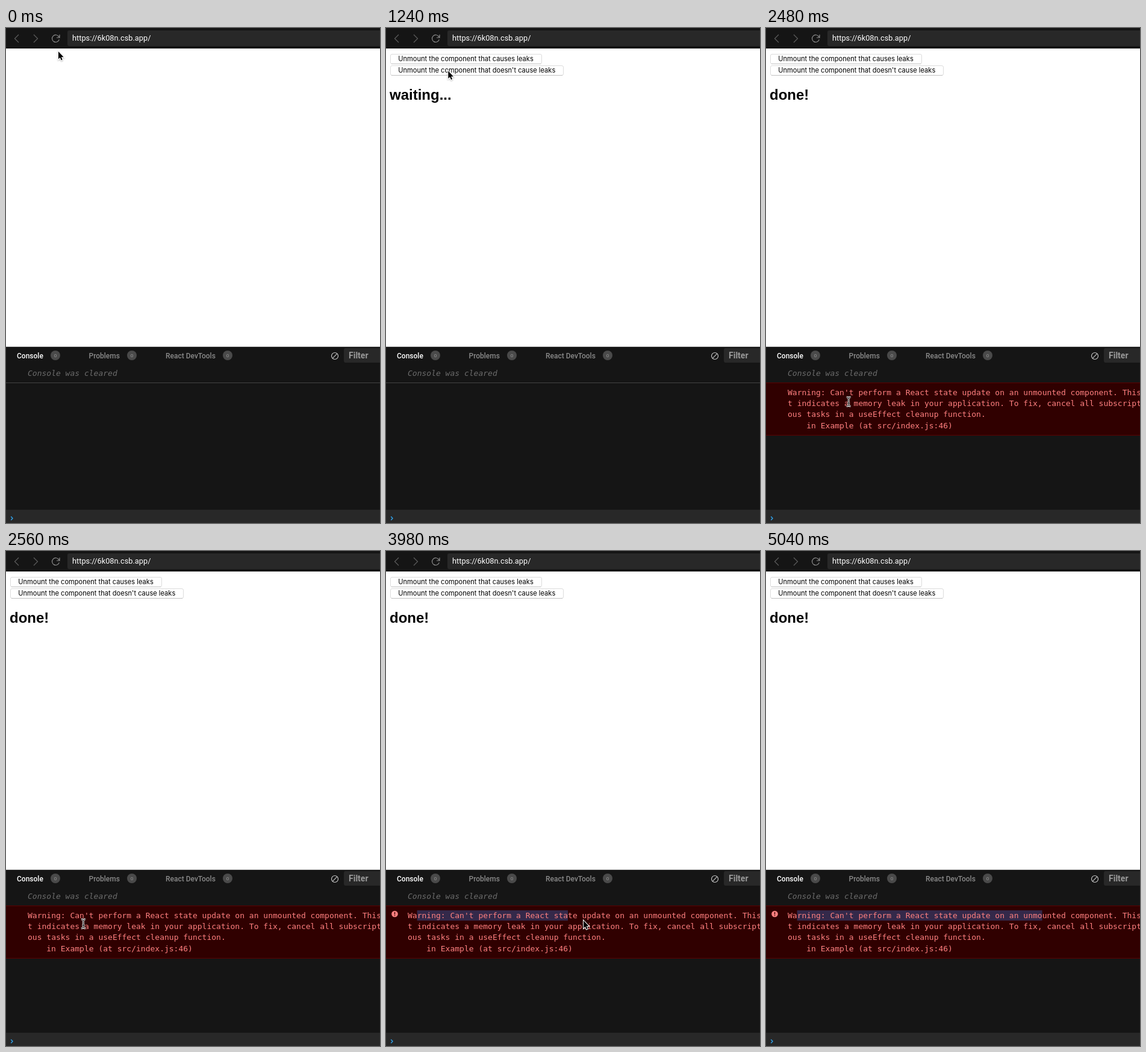
An HTML page for the animation above (5.76 s loop, 621 px wide and 821 px high).

```html
<!DOCTYPE html>
<html lang="en">
<head>
<meta charset="utf-8">
<title>Leaking component demo</title>
<style>
  html, body { margin: 0; width: 100%; height: 100%; overflow: hidden; background: #151515; }
  svg { display: block; width: 621px; height: 821px; }
  text { white-space: pre; }
  .url { font: 12.8px Roboto, sans-serif; fill: #fff; }
  .tab { font: 500 12px Roboto, sans-serif; fill: #8a8a8a; }
  .tab.active { fill: #fff; }
  .count { font: 8px Roboto, sans-serif; fill: #999; text-anchor: middle; }
  .filter { font: 700 14px Roboto, sans-serif; fill: #999; }
  .label { font: 11.1px Inter, sans-serif; fill: #000; }
  .title { font: 700 24px "Liberation Sans", Arial, sans-serif; fill: #000; }
  .log { font: 13px "DejaVu Sans Mono", monospace; fill: #ff8080; }
  .note { font: italic 13px "DejaVu Sans Mono", monospace; fill: #6c6c6c; }
  .line { fill: none; stroke-width: 1.2; }
  .button rect { fill: #fff; stroke: #dcdcdc; }
  .button path { stroke: #c2c2c2; }
  .button .pressed { fill: url(#pressed); stroke: none; }
  [hidden] { display: none; }
</style>
</head>
<body>
<svg viewBox="0 0 621 821">
  <defs>
    <linearGradient id="pressed" x2="0" y2="1">
      <stop stop-color="#d17fc5"/><stop offset="1" stop-color="#a83f98"/>
    </linearGradient>
    <filter id="shadow" x="-50%" y="-50%" width="200%" height="200%">
      <feDropShadow dx="0" dy="1" stdDeviation=".8" flood-opacity=".35"/>
    </filter>
    <path id="beamShape" d="M-3.5 -7.5Q0 -7.5 0 -5Q0 -7.5 3.5 -7.5M0 -5V5M-3.5 7.5Q0 7.5 0 5Q0 7.5 3.5 7.5M-2 2.5H2"/>
  </defs>

  <rect width="621" height="821" fill="#151515"/>

  <!-- address bar -->
  <path class="line" stroke="#5c5c5c" d="M21 11L14.5 17.5L21 24M46 11L52.5 17.5L46 24"/>
  <path class="line" stroke="#8c8c8c" d="M88.3 19.2A6 6 0 1 1 87.6 14.2L88.6 15.8M89 11V16H84"/>
  <rect x="102" y="4" width="530" height="26" rx="3" fill="#282828"/>
  <text class="url" x="110" y="21">https://6k08n.csb.app/</text>

  <!-- page -->
  <rect y="34" width="621" height="494" fill="#fff"/>
  <rect y="528" width="621" height="1" fill="#c4c4c4"/>
  <g id="page">
    <g class="button">
      <rect x="7.5" y="43.5" width="251" height="16" rx="2.5"/>
      <path d="M9 59.5H257"/>
      <rect id="press" class="pressed" x="7" y="43" width="252" height="17" rx="3"/>
      <text class="label" x="20.3" y="55">Unmount the component that causes leaks</text>
    </g>
    <text id="leakyTitle" class="title" x="6" y="100">waiting...</text>
    <g id="safe" class="button">
      <rect x="7.5" y="62.5" width="287" height="16" rx="2.5"/>
      <path d="M9 78.5H293"/>
      <text class="label" x="20.3" y="74">Unmount the component that doesn't cause leaks</text>
      <text id="safeTitle" class="title" x="6" y="119">waiting...</text>
    </g>
  </g>

  <!-- console -->
  <g class="tabs">
    <text class="tab active" x="18" y="548">Console</text>
    <text class="tab" x="137.5" y="548">Problems</text>
    <text class="tab" x="265" y="548">React DevTools</text>
    <g fill="#4a4a4a">
      <circle cx="82" cy="543" r="8"/><circle cx="209" cy="543" r="8"/><circle cx="368" cy="543" r="8"/>
    </g>
    <text class="count" x="82" y="546">0</text>
    <text class="count" x="209" y="546">0</text>
    <text class="count" x="368" y="546">0</text>
  </g>
  <g class="line" stroke="#c4c4c4"><circle cx="546" cy="544" r="5.5"/><path d="M542.2 547.8L549.8 540.2"/></g>
  <rect x="561" y="531" width="70" height="24" rx="3" fill="#282828"/>
  <text class="filter" x="569" y="548">Filter</text>
  <text class="note" x="36" y="577">Console was cleared</text>
  <rect y="588" width="621" height="1" fill="#444"/>
  <g id="warning">
    <rect y="588" width="621" height="88" fill="#5b0000"/>
    <rect y="589" width="621" height="86" fill="#300000"/>
    <g id="badge">
      <circle cx="14.5" cy="602" r="5.3" fill="#ff8080"/>
      <path d="M14.5 598.8V602.8M14.5 603.8V605.2" stroke="#300000" stroke-width="1.4"/>
    </g>
    <rect id="selection" x="51.6" y="596" height="17" fill="#34294a"/>
    <g class="log">
      <text x="36" y="609">Warning: Can't perform a React state update on an unmounted component. This is</text>
      <text x="36" y="627">t indicates a memory leak in your application. To fix, cancel all subscriptions</text>
      <text x="36" y="645">ous tasks in a useEffect cleanup function.</text>
      <text x="67.3" y="664">in Example (at src/index.js:46)</text>
    </g>
  </g>
  <rect y="799" width="621" height="22" fill="#282828"/>
  <path d="M8.3 810.3L11 813.3L8.3 816.3" fill="none" stroke="#2f9fe6" stroke-width="1.5"/>

  <g id="cursor">
    <path id="arrow" d="M1 1V13.6L3.8 11L5.8 15.5L7.7 14.6L5.8 10.3H9.7Z"
      stroke="#fff" stroke-width="2" paint-order="stroke" filter="url(#shadow)"/>
    <g id="beam" fill="none">
      <use href="#beamShape" stroke="#fff" stroke-width="2.8"/>
      <use href="#beamShape" stroke="#000"/>
    </g>
  </g>
</svg>
<script>
const LOOP = 5760, TICK = 88.4;
const TEXT_LEFT = 36, TEXT_TOP = 596, LINE = 18.2, CHAR = 7.826;
const $ = id => document.getElementById(id);

const linear = t => t;
const easeIn = t => t ** 1.6;
const easeOut = t => 1 - (1 - t) ** 2.3;

const REST = { x: 86, y: 38 };
const MOVES = [
  { from: 2, to: 3, x: 86, y: 46, ease: linear },        // onto the first button
  { from: 12, to: 20, x: 236, y: 268, ease: easeIn },    // away after the click
  { from: 20, to: 26, x: 146, y: 621, ease: easeOut },   // down to the console
  { from: 27, to: 38, x: 49, y: 606, ease: linear },     // to the start of the warning
  { from: 39, to: 41, x: 141, y: 609, ease: linear },    // drag a selection
  { from: 41, to: 45, x: 327, y: 612, ease: linear },
  { from: 45, to: 49, x: 459.5, y: 606, ease: easeOut },
  { from: 51, to: 57, x: 557, y: 850, ease: linear }     // out of the window
];
const CLICK = 10, UNMOUNT = 12, WARN = 28, BADGE = 30, DRAG = 39, DROP = 50;

function pointerAt(tick) {
  let { x, y } = REST;
  for (const move of MOVES) {
    const progress = (tick - move.from) / (move.to - move.from);
    const k = move.ease(Math.min(Math.max(progress, 0), 1));
    x += (move.x - x) * k;
    y += (move.y - y) * k;
  }
  return { x, y };
}

// the selection trails the drag by half a tick
function selectedWidth(tick) {
  if (tick <= DRAG) return 0;
  const { x } = pointerAt(Math.min(tick - 0.5, DROP));
  return Math.max(Math.floor((x - TEXT_LEFT) / CHAR) - 2, 0) * CHAR;
}

function isOverText(y) {
  const offset = y - TEXT_TOP;
  return offset > 0 && offset < 4 * LINE && offset % LINE < 15.9;
}

const show = (id, on) => $(id).toggleAttribute('hidden', !on);
const move = (id, x, y) => $(id).setAttribute('transform', `translate(${x} ${y})`);

function render(time) {
  const tick = Math.floor((time % LOOP + 5) / TICK);
  const mounted = tick < UNMOUNT;
  const warned = tick >= WARN;

  show('page', tick >= 1);
  show('press', mounted && tick >= CLICK);
  show('leakyTitle', mounted);
  move('safe', 0, mounted ? 82 : 0);
  $('safeTitle').textContent = warned ? 'done!' : 'waiting...';

  show('warning', warned);
  show('badge', tick >= BADGE);
  $('selection').setAttribute('width', selectedWidth(tick));

  const { x, y } = pointerAt(tick);
  const beam = warned && isOverText(y);
  show('beam', beam);
  show('arrow', !beam);
  move('cursor', x, y);
}

const start = performance.now();
function frame() {
  render(performance.now() - start);
  requestAnimationFrame(frame);
}
frame();
</script>
</body>
</html>
```
